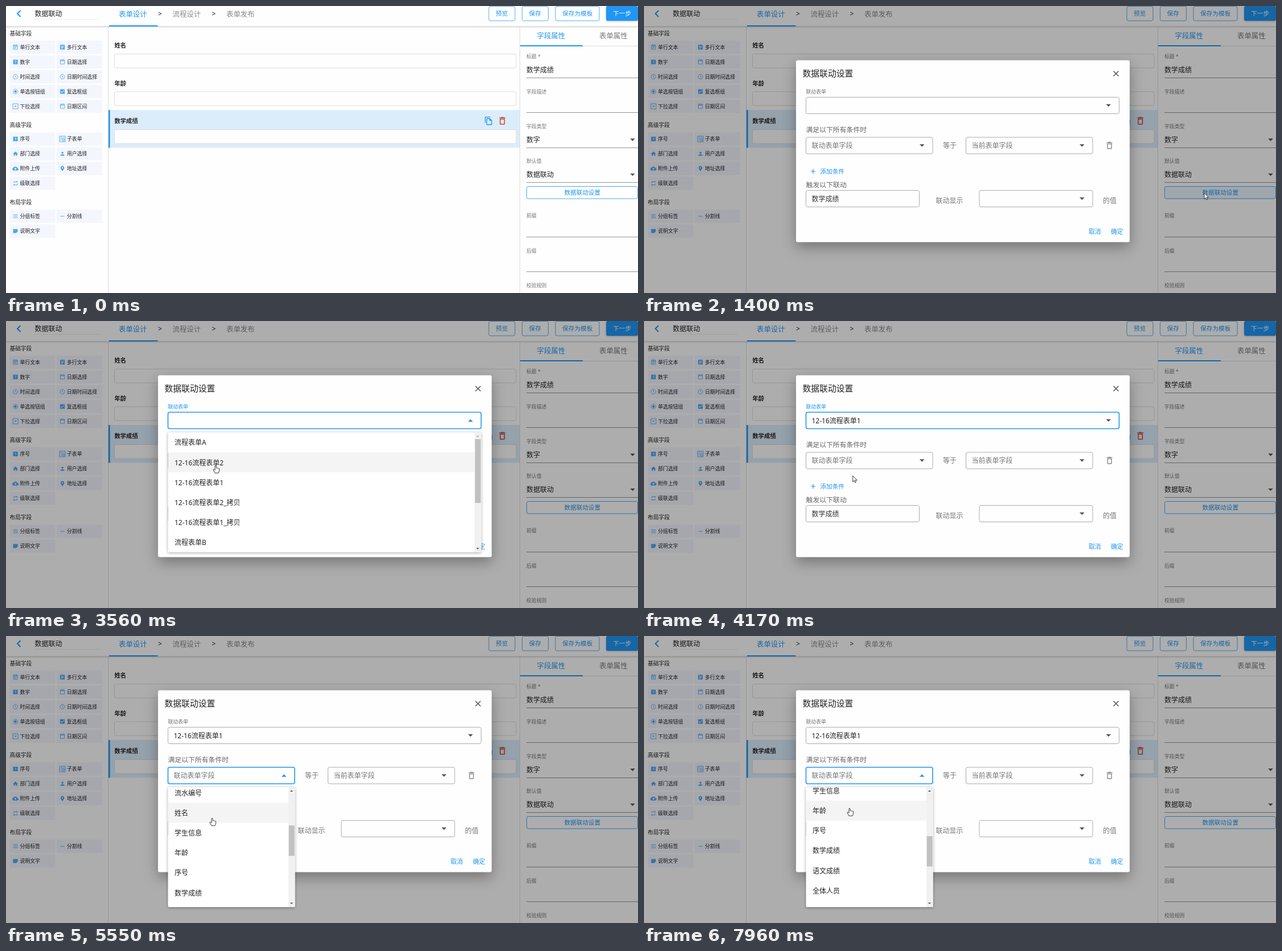
An HTML page that plays this animation: 1110x505 px, repeating every 8 s.

```html
<!DOCTYPE html>
<html lang="zh-CN">
<head>
<meta charset="utf-8">
<style>
  html, body { margin: 0; width: 100%; height: 100%; overflow: hidden; background: #fefefe; }
  svg { display: block; font-family: "Noto Sans", "Noto Sans CJK SC", "Noto Sans CJK", sans-serif; }
  text { white-space: pre; }
  .bar { filter: drop-shadow(0 1px 1.5px rgba(0,0,0,.25)); }
  .paper { filter: drop-shadow(0 9px 12px rgba(0,0,0,.32)); }
  .menu { filter: drop-shadow(0 1.5px 2.5px rgba(0,0,0,.35)); }
</style>
</head>
<body>
<svg width="1110" height="505" viewBox="0 0 1110 505">
  <defs>
    <clipPath id="button"><rect x="914" y="317" width="196" height="22" rx="3"/></clipPath>
    <clipPath id="menuA"><rect x="284" y="196" width="551" height="211"/></clipPath>
    <clipPath id="menuB"><rect x="284" y="266" width="223.5" height="211"/></clipPath>
  </defs>
  <g id="page"></g>
  <g id="live"></g>
</svg>
<script>
const BLUE = '#2196f3', INK = '#222', GRAY = '#777', EDGE = '#ddd';
const LOOP = 8000, ROW = 35.2, TICK = 73.3;

// Drawing helpers; text is placed by its left edge and vertical centre.
const text = (x, cy, s, size = 12, fill = INK, weight = 400) =>
  `<text x="${x}" y="${cy + size * .37}" font-size="${size}" fill="${fill}" font-weight="${weight}">${s}</text>`;
const rect = (x, y, w, h, fill = 'none', stroke = 'none', rx = 0, more = '') =>
  `<rect x="${x}" y="${y}" width="${w}" height="${h}" fill="${fill}" stroke="${stroke}" rx="${rx}" ${more}/>`;
const path = (d, fill, stroke = 'none', width = 1, more = '') =>
  `<path d="${d}" fill="${fill}" stroke="${stroke}" stroke-width="${width}" fill-rule="evenodd" ${more}/>`;
const at = (x, y, scale, body) => `<g transform="translate(${x} ${y}) scale(${scale})">${body}</g>`;
const triangle = (x, y, up, fill = '#555', r = 4.3) =>
  path(`M${x - r} ${y + (up ? r / 2 : -r / 2)}h${2 * r}l${-r} ${up ? -r : r}z`, fill);

// Icons on a 24 unit grid: s = stroked outline, f = filled shape.
const ICONS = {
  event: { s: 'M4 4H20V20H4ZM4 7H20M8 1V4M16 1V4M7 11H17M7 15H14' },
  tasks: { f: 'M3 3H9L12 1 15 3H21V21H3ZM7 7V9H17V7ZM7 11V13H17V11ZM7 15V17H14V15Z' },
  one: { f: 'M3 3H21V21H3ZM14 17H12V9H10V7H14Z' },
  date: { s: 'M4 4H20V20H4ZM4 7.5H20M8 1V4M16 1V4' },
  clock: { s: 'M12 3a9 9 0 1 0 .1 0ZM12 7V12.5L16 15' },
  radio: { s: 'M12 3a9 9 0 1 0 .1 0Z', f: 'M12 7a5 5 0 1 0 .1 0Z' },
  check: { f: 'M3 3H21V21H3ZM10 17L19 8 17.6 6.6 10 14.2 6.4 10.6 5 12Z' },
  drop: { s: 'M2 2H22V22H2Z', f: 'M7 10H17L12 15Z' },
  sub: { s: 'M1 1H23V23H1ZM5 6H12M5 11H9M5 16H9M15 6H19M12 11H19V19H12Z' },
  home: { f: 'M10 20v-6h4v6h5v-8h3L12 3 2 12h3v8z' },
  user: { f: 'M12 4a4 4 0 1 0 .1 0ZM4 20V18C4 12.7 20 12.7 20 18V20Z' },
  cloud: { f: 'M19.3 10C18.7 6.6 15.6 4 12 4 9.1 4 6.6 5.6 5.3 8 2.3 8.4 0 11 0 14c0 3.3 2.7 6 6 6h13c2.8 0 5-2.2 5-5 0-2.6-2-4.8-4.7-5zM14 13v4h-4v-4H7l5-5 5 5z' },
  pin: { f: 'M12 2C8 2 5 5 5 9c0 5 7 13 7 13s7-8 7-13c0-4-3-7-7-7zM12 6.5a2.5 2.5 0 1 1-.1 0Z' },
  cycle: { f: 'M7 7h10v3l4-4-4-4v3H5v6h2zM17 17H7v-3l-4 4 4 4v-3h12v-6h-2z' },
  lines: { s: 'M3 6H21M3 12H21M3 18H21' },
  minus: { s: 'M4 12H20' },
  note: { f: 'M3 4H21V14L15 20H3Z' },
  copy: { f: 'M16 1H4Q2 1 2 3V17H4V3H16ZM15 5L21 11V21Q21 23 19 23H8Q6 23 6 21V7Q6 5 8 5ZM8 7V21H19V12H14V7Z' },
  trash: { f: 'M6 19Q6 21 8 21H16Q18 21 18 19V7H6ZM8 9H16V19H8ZM15.5 4L14.5 3H9.5L8.5 4H5V6H19V4Z' }
};
const icon = (name, x, y, scale, color) => {
  const { s, f } = ICONS[name];
  return at(x, y, scale, (s ? path(s, 'none', color, 2) : '') + (f ? path(f, color) : ''));
};

const GROUPS = [
  ['基础字段', 48, 'event单行文本 tasks多行文本 one数字 date日期选择 clock时间选择 clock日期时间选择 radio单选按钮组 check复选框组 drop下拉选择 date日期区间'],
  ['高级字段', 209.5, 'one序号 sub子表单 home部门选择 user用户选择 cloud附件上传 pin地址选择 cycle级联选择'],
  ['布局字段', 345.5, 'lines分组标签 minus分割线 note说明文字']
];
const sidebar = () => GROUPS.map(([title, y, list]) =>
  text(6.5, y, title, 9.7) + list.split(' ').map((entry, i) => {
    const [, name, label] = entry.match(/^([a-z]+)(.+)$/);
    const x = i % 2 ? 89 : 6.5, cy = y + 24.5 + 26 * (i >> 1);
    return rect(x, cy - 11.5, 80, 23, '#f3f6fd') +
      icon(name, x + 4.7, cy - 5.4, .45, '#4ea6f1') + text(x + 18, cy, label, 8.85);
  }).join('')).join('');

const header = () =>
  rect(0, -5, 1110, 40.5, '#fefefe', 'none', 0, 'class="bar"') +
  path('M25.5 8L20 13.5 25.5 19', 'none', BLUE, 2) + text(50.5, 13.5, '数据联动') +
  path('M51 23.5H165', 'none', '#ddd', 1, 'stroke-dasharray="1 1"') +
  text(198, 14.5, '表单设计', 12.4, BLUE) + text(292.5, 14.5, '流程设计', 12.4, '#888') +
  text(387, 14.5, '表单发布', 12.4, '#888') +
  [267, 361.5].map(x => text(x, 14, '&gt;', 12)).join('') +
  rect(181, 34, 85.5, 2, BLUE) +
  [[848, 46, '预览'], [906.5, 46, '保存'], [965, 77, '保存为模板']].map(([x, w, s]) =>
    rect(x, .5, w, 25.5, 'none', '#58aef5', 3) + text(x + 12, 13.5, s, 10.7, BLUE)).join('') +
  rect(1054, 0, 56, 26, BLUE, 'none', 3, 'class="bar"') + text(1066, 13.5, '下一步', 10.7, '#fff');

const form = () =>
  rect(179, 183, 723, 66.5, '#dbedfb') + rect(179, 183, 3.6, 66.5, BLUE) +
  [['姓名', 69.5], ['年龄', 135.8], ['数学成绩', 202.5]].map(([s, y]) =>
    text(190.5, y, s, 10.3, INK, 700) + rect(190.5, y + 15, 705.5, 24.5, '#fefefe', EDGE, 3)).join('') +
  icon('copy', 839.7, 194, .67, BLUE) + icon('trash', 862.7, 193, .75, '#d0442e');

const PROPS = [['标题 *', '数学成绩'], ['字段描述', ''], ['字段类型', '数字', 1], ['默认值', '数据联动', 1], null, ['前缀', ''], ['后缀', ''], ['校验规则', '']];
const properties = () =>
  path('M179.5 36V505M902.5 36V505M903 70.5H1110', 'none', EDGE) +
  text(932.5, 52, '字段属性', 12.4, BLUE) + text(1042, 52, '表单属性', 12.4, GRAY) +
  rect(903, 69, 110, 2, BLUE) +
  PROPS.map((p, i) => {
    if (!p) return '';
    const y = 89 + 61.4 * i - (i > 4 ? 27 : 0);
    return text(914, y, p[0], 8.9, GRAY) + text(914, y + 23.7, p[1]) +
      (p[2] ? triangle(1100.5, y + 23.7, false) : '') +
      path(`M914 ${Math.round(y + 37) + .5}H1110`, 'none', '#949494');
  }).join('') +
  rect(914.5, 317.5, 195, 21.5, 'none', '#4aa8f5', 3) + text(980.5, 328.2, '数据联动设置', 10.6, BLUE);

const FORMS = ['流程表单A', '12-16流程表单2', '12-16流程表单1', '12-16流程表单2_拷贝', '12-16流程表单1_拷贝', '流程表单B', '流程表单C', '流程表单D', '流程表单E', '流程表单F'];
const FIELDS = '标题 流程状态 发起人 发起时间 更新时间 所属部门 流水编号 姓名 学生信息 年龄 序号 数学成绩 语文成绩 全体人员 单选按钮组 复选框组 日期选择 日期区间 下拉选择 附件上传 说明文字'.split(' ');

// Pointer hot spot: time, x, y.
const TRACK = [
  [70, 504, 442], [840, 1009, 325], [1240, 1009, 325], [1400, 984, 329], [1780, 585, 266],
  [1860, 580, 264], [2640, 440, 203], [2950, 425, 177], [3060, 425, 177], [3480, 368, 254],
  [3580, 368, 254], [3850, 372, 284], [4000, 372, 284], [4330, 362, 262], [4700, 349, 247],
  [5000, 349, 247], [5240, 356, 300], [5790, 366, 334], [6190, 366, 334], [6460, 360, 338],
  [6510, 360, 338], [6580, 362, 364], [7270, 360, 364], [7660, 340, 300], [7810, 340, 300], [7940, 361, 303]
];
const ease = (t, a, b) => {
  const k = Math.min(1, Math.max(0, (t - a) / (b - a)));
  return k * k * (3 - 2 * k);
};
const pointerAt = t => TRACK.reduce(([x, y], [end, nx, ny], i) => {
  const k = ease(t, TRACK[Math.max(0, i - 1)][0], end);
  return i ? [x + (nx - x) * k, y + (ny - y) * k] : [nx, ny];
}, [0, 0]);
const inside = ([px, py], x, y, w, h) => px >= x && px <= x + w && py >= y && py <= y + h;

const CURSORS = {
  arrow: path('M0 0V10.5L2.4 8.4 4 12 5.8 11.2 4.2 7.8H7.5Z', '#fff', '#222', .9),
  hand: path('M-1 1V8.5L-2.5 7Q-4.2 6.5-4 8L-1 13.5H5Q6.6 11 6.6 8V5.5Q5.6 4.5 4.6 5.3 3.8 4.2 2.8 5 2 4 1.2 4.7V1Q0-1-1 1Z', '#fff', '#222', .9),
  beam: path('M-2-5H2M0-5V5M-2 5H2', 'none', '#222', 1)
};

function select(x, y, w, label, color, { hover, focus, open, arrow = true } = {}) {
  return rect(x, y, w, 29, 'none', focus ? BLUE : hover ? INK : '#aaa', 3, `stroke-width="${focus ? 1.6 : 1}"`) +
    text(x + 10, y + 15, label, 12, color) +
    (arrow ? triangle(x + w - 18.7, y + 14.5, open, open ? BLUE : '#555') : '');
}

function menu(id, y, w, items, scroll, pointer) {
  const x = 284.5, h = 211, right = x + w, track = h - 24, total = items.length * ROW;
  const hot = inside(pointer, x, y, w, h) ? Math.floor((pointer[1] - y + scroll) / ROW) : -1;
  const rows = items.map((s, i) => {
    const top = y + i * ROW - scroll;
    return (i === hot ? rect(x, top, w - 11.5, ROW, '#f4f4f4') : '') + text(296, top + ROW / 2 + .3, s, 12, INK);
  }).join('');
  return rect(x, y, w, h, '#fff', 'none', 2, 'class="menu"') + `<g clip-path="url(#${id})">${rows}</g>` +
    rect(right - 11.5, y, 11.5, h, '#f1f1f1') +
    rect(right - 10.8, y + 12 + track * scroll / total, 10, track * h / total, '#c1c1c1') +
    triangle(right - 6, y + 6.5, true, scroll ? '#505050' : '#a3a3a3', 2.7) +
    triangle(right - 6, y + h - 6.5, false, '#505050', 2.7);
}

function dialog(t, pointer, openA, openB) {
  const focusA = t >= 2950 && t < 4850, focusB = t >= 4850;
  const over = (x, y, w) => inside(pointer, x, y, w, 29);
  return rect(0, 0, 1110, 505, 'rgba(0,0,0,.32)') +
    rect(267, 95.5, 586, 320, '#fefefe', 'none', 3, 'class="paper"') +
    text(278.5, 119, '数据联动设置', 14.8) + path('M824.5 114.5l9 9m0-9l-9 9', 'none', '#555', 1.5) +
    text(284.5, 150.3, '联动表单', 8.9, focusA ? BLUE : GRAY) +
    select(284.5, 160.5, 550, t >= 3960 ? '12-16流程表单1' : '', INK, { focus: focusA, open: openA, hover: over(284, 160, 550) }) +
    text(284.5, 218, '满足以下所有条件时', 11.85, '#666') +
    select(284.5, 231, 222.5, '联动表单字段', GRAY, { focus: focusB, open: openB, hover: over(284, 231, 223) }) +
    text(525, 246, '等于', 12, GRAY) +
    select(565.5, 231, 222.5, '当前表单字段', GRAY, { hover: over(565, 231, 223) }) +
    icon('trash', 809.2, 237, .7, '#888') +
    path('M293 291H301M297 287V295', 'none', BLUE, 1.2) + text(309.3, 291, '添加条件', 10.7, BLUE) +
    text(284.5, 314.5, '触发以下联动', 11.9, '#666') +
    select(284.5, 324.5, 199, '数学成绩', '#333', { arrow: false }) +
    text(512.5, 343, '联动显示', 12, GRAY) + select(589, 324.5, 199, '', INK) +
    text(806, 343, '的值', 12, GRAY) +
    text(781, 397, '取消', 10.8, BLUE) + text(820, 397, '确定', 10.8, BLUE);
}

function scene(t) {
  const pointer = pointerAt(t);
  const openA = t >= 3040 && t < 3960, openB = t >= 4940;
  let out = '';
  if (t < 1600 && t >= 70 && pointer[0] > 914) out += rect(914, 317, 196, 22, BLUE, 'none', 3, 'opacity=".08"');
  if (t > 1090 && t < 1400) {
    out += `<circle cx="1008" cy="328" r="${(t - 1090) * .514}" fill="${BLUE}" opacity="${.25 * (1 - ease(t, 1250, 1400))}" clip-path="url(#button)"/>`;
  }
  if (t > 1240) out += `<g opacity="${ease(t, 1240, 1390)}">${dialog(t, pointer, openA, openB)}</g>`;
  if (openA) out += menu('menuA', 196, 550, FORMS, 0, pointer);
  if (openB) {
    const scroll = 5 * TICK * ease(t, 5240, 5790) - TICK * ease(t, 6730, 6960);
    out += menu('menuB', 266, 223, FIELDS, scroll, pointer);
  }
  if (t >= 70) {
    const onMenu = openA && inside(pointer, 284, 196, 538, 211) || openB && inside(pointer, 284, 266, 211, 211);
    const onField = t > 1400 && (inside(pointer, 284, 160, 525, 29) || inside(pointer, 284, 231, 195, 29) || inside(pointer, 565, 231, 195, 29));
    out += at(...pointer, 1, CURSORS[onMenu ? 'hand' : onField ? 'beam' : 'arrow']);
  }
  return out;
}

document.getElementById('page').innerHTML =
  rect(0, 0, 1110, 505, '#fefefe') + sidebar() + form() + properties() + header();
const live = document.getElementById('live');
const start = performance.now();
(function draw() {
  live.innerHTML = scene((performance.now() - start) % LOOP);
  requestAnimationFrame(draw);
})();
</script>
</body>
</html>
```
